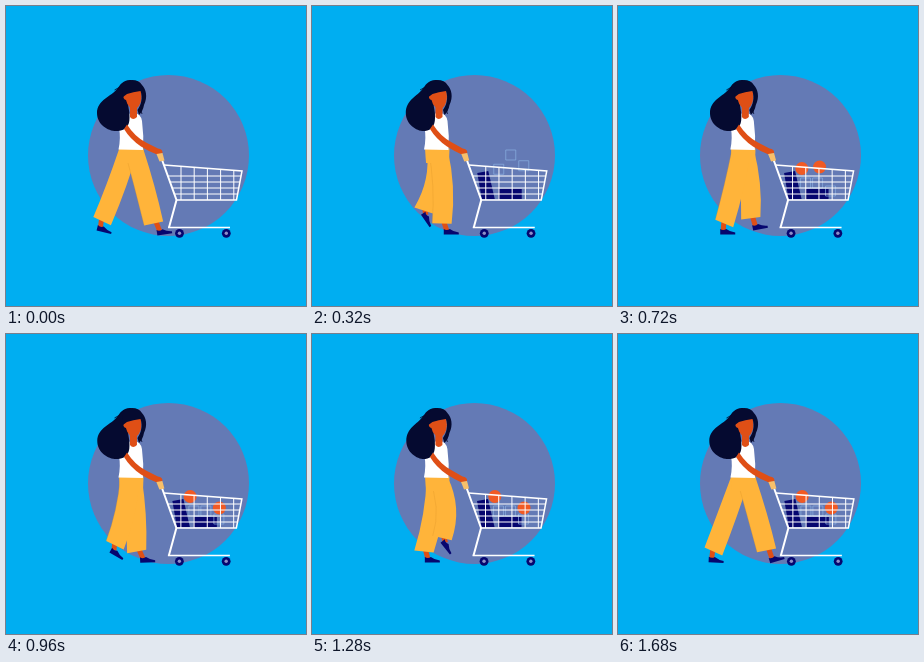
Recreate the animation shown at these times as an HTML page with a canvas. Size 300 by 300 pixels, loop 1760 ms.

```html
<!DOCTYPE html>
<html lang="en">
<head>
<meta charset="utf-8">
<title>Shopping walk</title>
<style>
html, body { margin: 0; width: 100%; height: 100%; overflow: hidden; background: #00aef1; }
canvas { display: block; width: 300px; height: 300px; }
</style>
</head>
<body>
<canvas id="stage" width="300" height="300"></canvas>
<script>
const ctx = document.getElementById('stage').getContext('2d');
const STEP_MS = 80, STEPS = 22;
const SKIN = '#df4f16', HAIR = '#050a30', NAVY = '#06066f', PANTS = '#ffb43a', ORANGE = '#f15a24';
const { sin, cos, max, min, abs, PI } = Math;
const rad = deg => deg * PI / 180;

// Foot travel: step of the furthest reach, middle and half width of the stride
const nearLeg = { peak: -0.7, middle: 133, reach: 25.5 };
const farLeg = { peak: 10.4, middle: 120.5, reach: 23 };

function fill(path, color) {
  ctx.fillStyle = color;
  ctx.fill(new Path2D(path));
}

function stroke(path, color, width) {
  ctx.strokeStyle = color;
  ctx.lineWidth = width;
  ctx.stroke(new Path2D(path));
}

function disc(x, y, r, color) {
  ctx.fillStyle = color;
  ctx.beginPath();
  ctx.arc(x, y, r, 0, 2 * PI);
  ctx.fill();
}

function placed(x, y, angle, draw) {
  ctx.save();
  ctx.translate(x, y);
  ctx.rotate(angle);
  draw();
  ctx.restore();
}

// The first half of each cycle is stance, the second half swings forward
function gait({ peak, middle, reach }, step) {
  const phase = 2 * PI * (step - peak) / STEPS;
  const swing = max(0, -sin(phase));
  const heelLift = max(0, -sin(phase + 0.25)) ** 1.5;
  const toeLift = max(0, cos(phase + 0.2)) ** 8;
  const x = middle + reach * cos(phase), y = 226.5 - 13.5 * swing;
  return {
    x, y,
    turn: rad(55 * heelLift - 17 * toeLift),
    hemX: x - 6 - 4 * cos(phase) - 2 * sin(phase),
    hemY: y - 9,
    hemTurn: rad(6 - 18 * cos(phase) + 8 * swing),
    bend: 6 * abs(sin(phase)) + 6 * swing
  };
}

function drawLeg(leg, step, outlined) {
  const { x, y, turn, hemX, hemY, hemTurn, bend } = gait(leg, step);
  const ankleX = x - 4 * cos(turn) + 2 * sin(turn);
  const ankleY = y - 4 * sin(turn) - 2 * cos(turn);
  stroke(`M${hemX + (ankleX - hemX) * 0.3},${hemY - 3}L${ankleX},${ankleY}`, SKIN, 5);
  placed(x, y, turn, () => fill('M-7,-3.5Q-4,-1.5 -1,-3.5Q3,-.5 8,0L8,2L-7,2Z', NAVY));

  const hip = 125 + max(-3, min(3, 0.1 * (hemX - 120)));
  const knee = (hip + hemX) / 2 + bend, kneeY = (143 + hemY) / 2;
  const dx = 9.7 * cos(hemTurn), dy = 9.7 * sin(hemTurn);
  const left = `M${hip - 9.5},143Q${knee - 10.5},${kneeY} ${hemX - dx},${hemY - dy}`;
  fill(`${left}L${hemX + dx},${hemY + dy}Q${knee + 10.5},${kneeY} ${hip + 9.5},143Z`, PANTS);
  if (outlined) stroke(left, 'rgba(214,143,40,.45)', 0.6);
}

function drawWoman(step, cartX, sway) {
  drawLeg(farLeg, step, false);
  drawLeg(nearLeg, step, true);
  fill('M113,142.5H137.5L137,157H114Z', PANTS);

  placed(cartX * 0.4, 0, 0, () => {
    fill('M122,108Q134,104 136,115Q138,130 137,144L112.5,143.5Q115,132 113,122Q114,112 122,108Z', '#fff');
    fill('M124,98H131V111Q127,115 124,111Z', SKIN);
    const edge = 91 + 2 * sway;
    fill(`M126,74C117,73 114,79 111,83C106,90 ${edge},94 ${edge},107`
      + `C${edge},119 ${edge + 12},126 ${112 + sway},125C120,124 123.5,120 123.5,112`
      + 'C124,106 122,102 122,96V80Z', HAIR);
    fill('M118,85H135Q137,98 130,103Q122,103 120,94Q117,93 117.5,90Z', SKIN);
    fill('M117,91Q113,76 126,74Q133,74 136,79C140,83 142,91 138,99Q137,105 133,109'
      + 'L131.5,104C135,99 137,92 134.5,85Q127,86 121,88Z', HAIR);
    stroke('M119,76Q114,82 108.5,84M137,96Q134,104 136,108', HAIR, 0.8);
  });

  const hand = 155 + cartX;
  fill(`M121,118.5Q129,131 140,136.5L${hand - 3},142.5Q${hand + 2},143 ${hand + 1.5},147`
    + `L${hand - 4},148.5Q142,145 135,140.5Q124,133 118,123Z`, SKIN);
}

// Draws an item that drops onto its place and lies there
function drop(step, land, x, y, draw) {
  const early = max(0, land - step);
  if (early < 2.7) placed(x, y - 7 * early ** 2, 0, draw);
}

function drawGoods(step) {
  const crate = () => stroke('M-5,-5H5V5H-5Z', 'rgba(138,176,226,.7)', 1);
  const ball = () => disc(0, 0, 6.5, ORANGE);
  drop(step, 3, 166.5, 165, () => fill('M0,2L11,0L17.5,28H4.5Z', NAVY));
  drop(step, 3.5, 188, 183, () => fill('M0,0H23V10H0Z', NAVY));
  drop(step, 5.4, 188, 177, crate);
  drop(step, 6, 200, 177, crate);
  drop(step, 5.9, 213, 185, crate);
  drop(step, 8, 184.3, 162.5, ball);
  const roll = max(0, min(1, (step - 9) / 3));
  drop(step, 8.65, 202 + 11.5 * roll, 161 + 13 * roll, ball);
}

function drawCart() {
  let grid = '';
  for (let i = 0; i < 5; i++) {
    const x = 175 + 13.2 * i;
    grid += `M${x},${160.3 + i}V194`;
  }
  for (let y = 170; y < 190; y += 6) {
    const u = (y - 159) / 35;
    grid += `M${158 + 12 * u},${y}H${237 - 6 * u}`;
  }
  stroke(grid, '#fff', 1);
  stroke('M158,159L236,165L230.5,194H170', '#fff', 1.5);
  stroke('M155,151L170.5,194L163,221.5', '#fff', 2);
  stroke('M162,221.5H224', '#fff', 1.3);
  fill('M150.5,148L156.5,147L158.5,154.5L153.5,155.5Z', '#f8c06a');
  for (const x of [173.5, 220.3]) {
    disc(x, 227.3, 4.4, NAVY);
    disc(x, 227.3, 1.7, '#8d8fc8');
  }
}

function draw(step) {
  const sway = 1 - cos(4 * PI * step / STEPS);
  const cartX = -0.75 * sway;
  ctx.fillStyle = '#00aef1';
  ctx.fillRect(0, 0, 300, 300);
  disc(162.5, 149.5, 80.5, '#647ab5');
  drawWoman(step, cartX, sway);
  placed(cartX, 0, 0, () => {
    drawGoods(step);
    drawCart();
  });
}

function tick() {
  draw(Math.floor(performance.now() / STEP_MS) % STEPS);
  requestAnimationFrame(tick);
}
tick();
</script>
</body>
</html>
```
